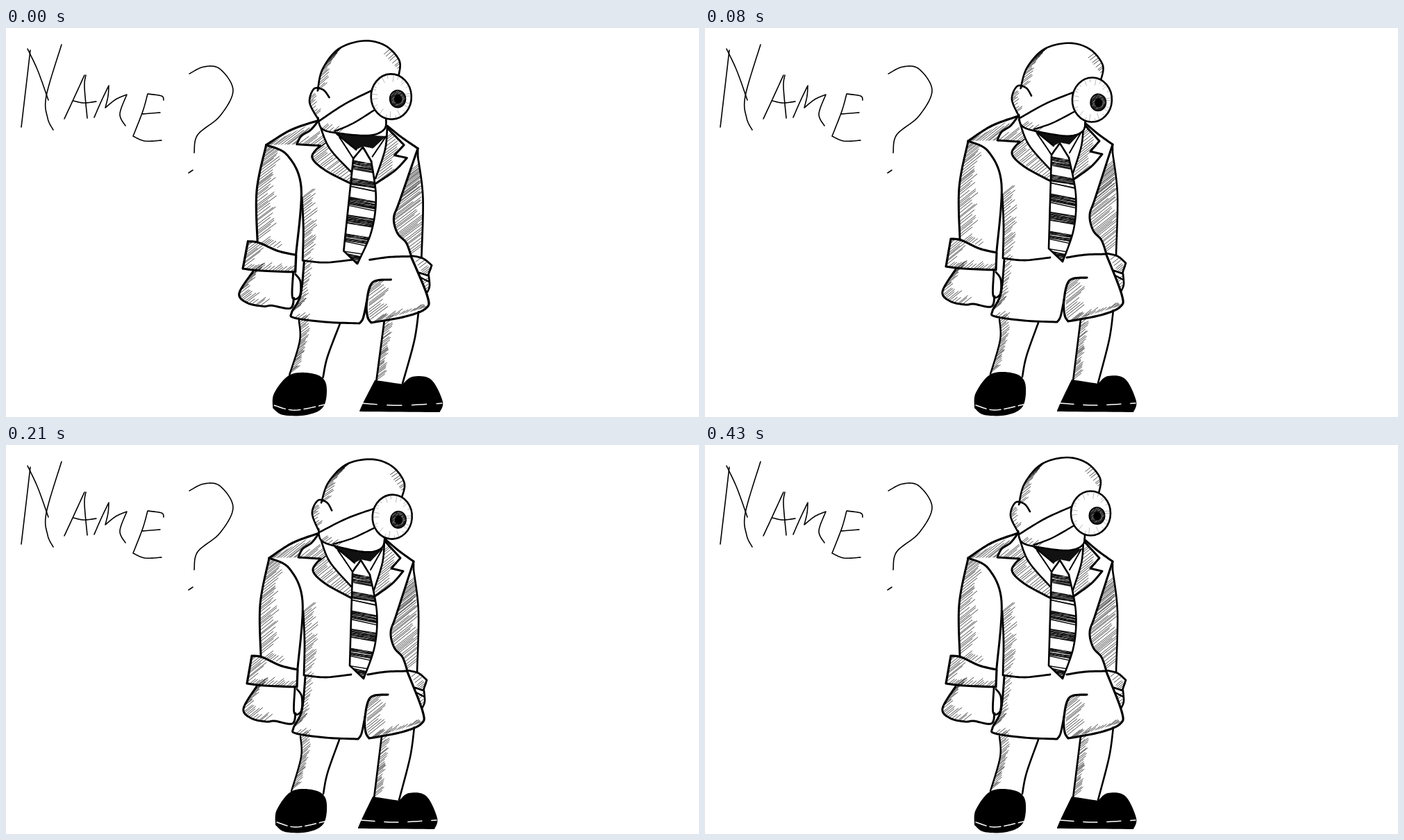
These frames come from a looping animation (998x561 px, 560 ms). An HTML page with a canvas:

```html
<!DOCTYPE html>
<html lang="en">
<head>
<meta charset="utf-8">
<title>Name?</title>
<style>
html, body { margin: 0; width: 100%; height: 100%; overflow: hidden; background: #fff; }
canvas { display: block; }
</style>
</head>
<body>
<canvas id="stage" width="998" height="561"></canvas>
<script>
const ctx = document.getElementById('stage').getContext('2d');
const W = 998, H = 561, LOOP = 560;
const NECK = { x: 489, y: 111 };

// Start time, head turn, head shift and head size; sag lowers and widens the body.
const poses = [
  { at: 0, turn: -0.04, x: -1.5, y: 3.5, size: 1.02, sag: 8 },
  { at: 80, turn: 0.038, x: 1.5, y: 2.5, size: 1, sag: 0 },
  { at: 160, turn: 0.076, x: 0, y: 0, size: 1, sag: 0 },
  { at: 240, turn: 0, x: 0, y: 0, size: 1, sag: 0 }
];

let seed = 1;
function rand() {
  seed = (seed * 16807) % 2147483647;
  return seed / 2147483647;
}

// Smooth curve through "x,y" points as a fine polyline; "!" marks a sharp corner.
function trace(text) {
  const keys = text.trim().split(/\s+/).map(s => {
    const [x, y] = s.replace('!', '').split(',').map(Number);
    return { x, y, sharp: s.endsWith('!') };
  });
  const out = [keys[0]];
  for (let i = 1; i < keys.length; i++) {
    const b = keys[i - 1], c = keys[i];
    const a = b.sharp ? b : keys[i - 2] || b;
    const d = c.sharp ? c : keys[i + 1] || c;
    for (let k = 1; k <= 10; k++) {
      const t = k / 10;
      const mix = n => b[n] + t / 2 * (c[n] - a[n] + t * (2 * a[n] - 5 * b[n] + 4 * c[n] - d[n]
        + t * (3 * b[n] - a[n] - 3 * c[n] + d[n])));
      out.push({ x: mix('x'), y: mix('y') });
    }
  }
  return out;
}

function curve(text) {
  const path = new Path2D();
  trace(text).forEach(p => path.lineTo(p.x, p.y));
  return path;
}

function line(text, width = 3) {
  ctx.lineWidth = width;
  ctx.stroke(curve(text));
}

function fill(text, color = '#000') {
  ctx.fillStyle = color;
  ctx.fill(curve(text));
}

function within(text, draw) {
  ctx.save();
  ctx.clip(curve(text));
  draw();
  ctx.restore();
}

function dash(x, y, dx, dy, width, color = '#000') {
  ctx.strokeStyle = color;
  ctx.lineWidth = width;
  ctx.beginPath();
  ctx.moveTo(x, y);
  ctx.lineTo(x + dx, y + dy);
  ctx.stroke();
  ctx.strokeStyle = '#000';
}

// Loose rising strokes that start along an edge.
function hatch(edge, reach, step = 3.8) {
  let wait = 0;
  trace(edge).forEach((p, i, all) => {
    if (!i) return;
    const q = all[i - 1], d = Math.hypot(p.x - q.x, p.y - q.y);
    for (; wait < d; wait += step * (0.5 + rand())) {
      const f = wait / d, r = reach * (0.55 + rand() * 0.5);
      dash(q.x + (p.x - q.x) * f, q.y + (p.y - q.y) * f, r, -0.8 * r, 0.7);
    }
    wait -= d;
  });
}

function oval(x, y, rx, ry, color, width) {
  ctx.beginPath();
  ctx.ellipse(x, y, rx, ry, 0, 0, 2 * Math.PI);
  ctx.fillStyle = color;
  ctx.fill();
  if (width) {
    ctx.lineWidth = width;
    ctx.stroke();
  }
}

function lettering() {
  [
    '35,32 30,75 22,143', '31,30 46,62 61,104', '80,24 58,98 60,130 68,147',
    '84,131 97,103 113,68', '115,68 113,85 117,130', '97,105 112,108 130,106',
    '127,129 137,106 148,83! 147,98 143,115! 158,103 174,96! 164,124 172,141',
    '227,104 224,98 204,95! 197,120 183,156! 200,163 224,162', '196,124 222,122',
    '264,66 285,56 308,59 327,90 308,127 276,154 271,180', '263,209 269,205'
  ].forEach(s => line(s, 1.6));
}

function sole(text, pattern) {
  ctx.save();
  ctx.strokeStyle = '#fff';
  ctx.setLineDash(pattern);
  line(text, 1.5);
  ctx.restore();
}

function legs() {
  const left = '424,420 425,450 411,499', right = '541,420 530,509';
  hatch(left, 13, 2.8);
  hatch(right, 13, 3);
  line(left, 2.4);
  line(right, 2.6);
  line('480,425 463,473 457,503', 2.6);
  line('588,407 582,450 566,512', 2.6);
  fill('388,548 390,526 412,499 445,498 461,512 458,545 435,558 402,558 388,548');
  fill('507,552! 513,538 528,507! 566,513! 580,502 605,506 621,538 617,554! 507,553!');
  sole('390,544 418,551 459,543', [16, 5]);
  sole('511,541 560,544 620,541', [20, 14]);
}

function shorts() {
  const side = '431,334 426,383 414,408';
  const fold = '550,360 525,364 517,392';
  hatch(side, 14);
  hatch('418,416 430,419', 12);
  within(fold + ' 523,423! 600,400! 550,360!', () => {
    hatch('520,372 520,423', 26);
    hatch('525,423 595,404', 17, 4.5);
  });
  line(side + ' 418,416 460,422 507,424! 512,416 517,392');
  line(fold + ' 518,414 523,423! 570,414 598,402 600,384 578,327', 3.2);
}

const chest = '587,168 562,245 554,270 559,292 571,306 578,326';

function farArm() {
  const sleeve = '587,180 594,240 592,328';
  within(chest + '! 592,328! 594,240 587,180', () => {
    hatch('577,200 554,270 578,326', 40, 3.2);
  });
  line('587,168 587,180', 2.6);
  line(sleeve, 2.6);
  hatch('584,334 596,353', 11);
  hatch('593,364 598,379', 9);
  line('578,325 594,329 606,339! 601,354! 589,350', 2.8);
  line('591,357 602,363', 2.2);
  line('602,354 603,370 599,380', 2.6);
}

// One lapel: its outer flap, its inner edge and the shading between them.
function lapel(outer, inner, edge) {
  const back = inner.split(' ').reverse().join(' ');
  within(`${outer}! ${back}`, () => hatch(edge, 23, 4));
  line(outer);
  line(inner, 2.6);
}

function jacket() {
  const seam = '428,240 430,285 429,332';
  within('379,163! 451,127! 427,150! 421,162! 379,163!', () => hatch('379,165 424,163', 34, 3.5));
  hatch(seam, 19);
  line(seam + '! 460,335 497,331', 2.8);
  line('521,331 548,327 578,326');
  line('379,163 413,141 451,127', 3.2);
  line('545,135 565,152 587,168');
  line(chest);
  lapel('451,127 440,141 427,150 421,162! 453,164! 442,181 460,200 498,221',
    '452,132 466,168 497,204', '423,162 452,166 442,182 498,222');
  lapel('545,138 568,163! 555,178! 572,182! 556,200 530,219',
    '545,138 542,170 529,212', '544,152 541,178 530,218');
}

function nearArm() {
  const outer = '379,163 366,230 367,305';
  const inner = '379,163 408,178 427,225 420,322';
  const cuff = '354,304 347,344! 372,347 419,349! 420,324! 395,318 369,306 354,304!';
  const palm = '361,348 342,380 353,394';
  within(`${outer}! 420,322! 427,225 408,178 379,163!`, () => {
    hatch(outer, 27, 3.6);
    hatch('372,307 395,316', 14);
  });
  within(cuff, () => {
    hatch('351,308 347,344', 26, 3.5);
    hatch('350,345 418,350', 14, 4);
  });
  hatch(palm, 18, 3.6);
  hatch('355,395 372,398', 13);
  line(outer);
  line(inner);
  line(cuff, 3.2);
  line(palm + ' 375,399 387,398 412,402 417,387');
  line('416,351 415,386 425,384 426,363 419,352', 2.8);
}

function tie() {
  const body = '499,184! 497,250 495,318! 515,337! 531,290 534,240 524,187!';
  const knot = '499,183 511,166! 524,187';
  fill('473,147! 502,170! 511,165! 525,168! 542,150! 473,147!', '#111');
  fill(`${knot}! 499,183!`, '#fff');
  fill(body, '#fff');
  within(body, () => {
    for (let i = 0; i < 6; i++) {
      const top = 183 + 27 * i;
      for (let y = 0; y < 13; y += 1.2) dash(493, top + y + rand() * 2, 44, 6 + rand() * 4, 1.5, '#111');
      for (let k = 0; k < 6; k++) dash(498 + rand() * 26, top + 5 + rand() * 12, 7, -2, 0.5, '#bbb');
    }
  });
  line(body, 2.6);
  line(knot, 2.6);
  line('474,147 502,170', 2.4);
  line('478,152 489,168 499,183', 2);
  line('542,150 525,180', 2);
}

function eye() {
  const x = 555.5, y = 98.5;
  oval(x, y, 28.5, 32, '#fff', 2.6);
  for (let i = 0; i < 24; i++) {
    const a = i / 24 * 2 * Math.PI + rand() * 0.2, r = 0.1 + rand() * 0.22;
    const c = 28 * Math.cos(a), s = 31 * Math.sin(a);
    dash(x + c, y + s, -c * r, -s * r, 0.5, '#777');
  }
  oval(564.5, 102, 11, 12, '#222', 2);
  for (let i = 0; i < 24; i++) {
    const r = 6 + rand() * 4;
    dash(564 + r * Math.cos(i * 2.4), 102 + r * Math.sin(i * 2.4), 2, -2, 0.7, '#aaa');
  }
  oval(565, 102.5, 5.5, 6.5, '#000');
}

function head() {
  const back = '452,86 460,56 484,28';
  const skull = back + ' 520,18 550,26 569,48 567,70';
  const chin = '547,126 544,144 522,152 478,147 456,140 451,124';
  const ear = '468,96 460,85 447,83 440,102 451,126';
  fill(`${skull} ${chin}`, '#fff');
  fill(ear, '#fff');
  within(`${skull} ${chin}`, () => {
    hatch(back, 15, 3.2);
    hatch('548,38 567,60', 14, 4);
    hatch('456,140 480,147', 9);
  });
  hatch('441,95 441,108 448,120', 9, 3.4);
  line(skull, 2.6);
  line(chin, 2.6);
  line(ear, 2.6);
  line('452,129 490,106 530,88', 2.6);
  line('474,144 500,134 530,117', 2.4);
  eye();
}

function draw({ turn, x, y, size, sag }) {
  seed = 4711;
  ctx.setTransform(1, 0, 0, 1, 0, 0);
  ctx.fillStyle = '#fff';
  ctx.fillRect(0, 0, W, H);
  ctx.strokeStyle = '#000';
  ctx.lineCap = ctx.lineJoin = 'round';
  lettering();

  ctx.save();
  const wide = sag / 160, sway = sag / 118;
  ctx.transform(1 + wide, 0, 0, 1 - sag / H, -465 * wide, sag);
  [legs, shorts, farArm, jacket, nearArm].forEach(part => part());
  ctx.transform(1, 0, -sway, 1, 175 * sway, 0);
  tie();
  ctx.restore();

  ctx.translate(NECK.x + x, NECK.y + y);
  ctx.rotate(turn);
  ctx.scale(size, size);
  ctx.translate(-NECK.x, -NECK.y);
  head();
}

let shown = null;
function tick() {
  const t = performance.now() % LOOP;
  const pose = poses.filter(p => p.at <= t).pop();
  if (pose !== shown) draw(shown = pose);
  requestAnimationFrame(tick);
}
tick();
</script>
</body>
</html>
```
